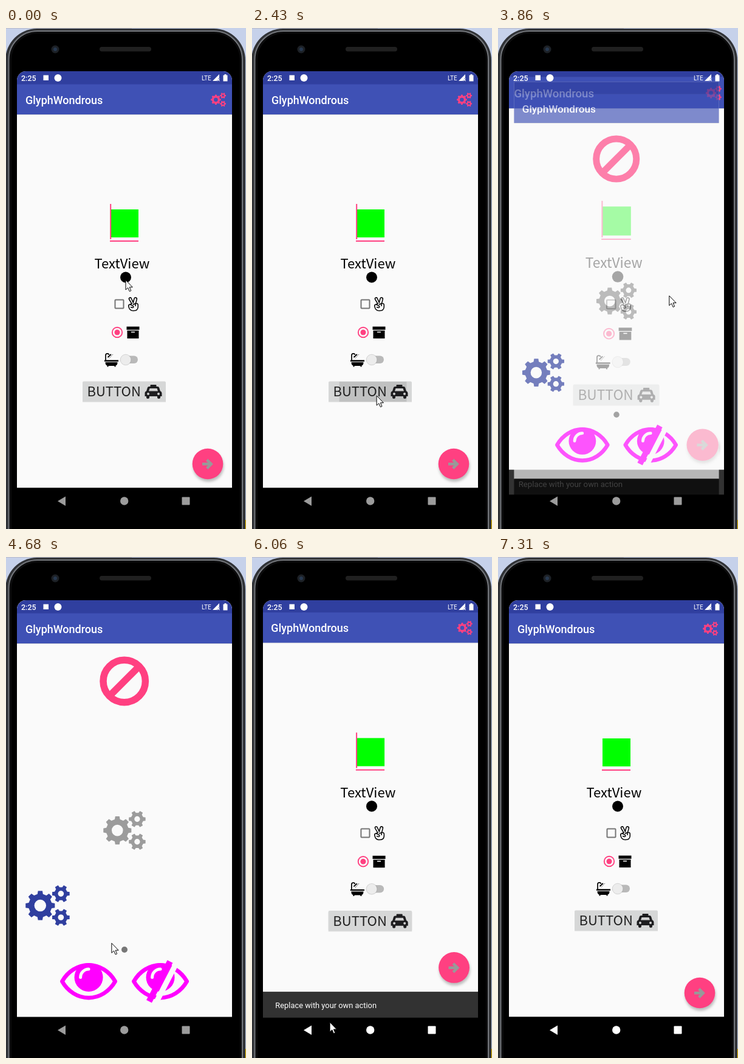
An HTML page for the animation above (7.43 s loop, 395 px wide and 823 px high).

```html
<!DOCTYPE html>
<html lang="en">
<head>
<meta charset="utf-8">
<title>Phone demo</title>
<style>
  html, body { margin: 0; width: 100%; height: 100%; overflow: hidden; background: #c6d1ea; }
  svg { display: block; width: 100vw; height: 100vh; }
  text { font-family: Roboto, sans-serif; fill: #fff; }
  .title { font-size: 18px; font-weight: 500; }
  .label { font-family: "Noto Sans CJK JP", "Noto Sans CJK SC", "Noto Sans CJK", "Noto Sans", sans-serif; font-size: 22px; fill: #000; }
  #fab { filter: drop-shadow(1px 4px 2px rgba(0,0,0,.25)); }
</style>
</head>
<body>
<svg viewBox="0 0 395 823">
  <defs>
    <clipPath id="screen"><path d="M18 803V86a15 15 0 0 1 15-15H357a15 15 0 0 1 15 15V803z"/></clipPath>
    <clipPath id="buttonArea"><rect x="126" y="581" width="137" height="33" rx="2"/></clipPath>
    <path id="cogs" fill-rule="evenodd"/>
    <g id="eye">
      <path d="M64 960C240 650 550 448 896 448S1552 650 1728 960C1552 1270 1242 1472 896 1472S240 1270 64 960Z"
        fill="none" stroke="#f0f" stroke-width="128" stroke-linejoin="round"/>
      <circle cx="896" cy="832" r="448" fill="#f0f"/>
      <path d="M640 832A256 256 0 0 1 896 576" fill="none" stroke="#fafafa" stroke-width="96" stroke-linecap="round"/>
    </g>
    <g id="chrome">
      <rect x="18" y="71" width="354" height="685" fill="#fafafa"/>
      <rect x="18" y="142" width="354" height="1" fill="#000" opacity=".12"/>
      <rect x="18" y="92" width="354" height="50" fill="#3f51b5"/>
      <rect x="18" y="71" width="354" height="21.500" fill="#303f9f"/>
      <text class="title" x="32" y="124.500">GlyphWondrous</text>
      <rect x="18" y="755.500" width="354" height="80"/>
    </g>
  </defs>

  <!-- phone body -->
  <path d="M0 0H207V1H0z" fill="#b9bccb"/>
  <path d="M391 808h4v15h-4z" fill="#fc0"/>
  <rect x="-1" y="1" width="395" height="900" rx="52" fill="#303236"/>
  <rect x="4.500" y="5" width="384.500" height="900" rx="47" fill="#0c0c0d" stroke="#75787d" stroke-width="2"/>
  <rect x="9" y="9" width="376" height="890" rx="43"/>
  <circle cx="81" cy="35" r="6.500" fill="#1d2126"/>
  <circle cx="81" cy="35" r="3" fill="#27384f"/>
  <rect x="154" y="31" width="85" height="7.500" rx="3.700" fill="#202020"/>

  <g clip-path="url(#screen)">
    <g id="main">
      <use href="#chrome"/>
      <use href="#cogs" transform="translate(337 106) scale(.0131)" fill="#ff4081"/>

      <rect x="172" y="298" width="46" height="46" fill="#0f0"/>
      <path d="M171 350H218" stroke="#ff4081" stroke-width="2"/>
      <path id="caret" d="M172.200 289V347" stroke="#ff4081" stroke-width="2"/>
      <text class="label" x="145.500" y="395">TextView</text>
      <circle cx="197" cy="409.500" r="9"/>

      <rect x="179.500" y="446.500" width="14" height="14" rx="1" fill="none" stroke="#757575" stroke-width="2"/>
      <path d="M207 453L202.500 445.500q-.5-2 1.400-2.500t2.400 1.200L209.300 451L211 444.500q.8-2.200 2.800-1.500t1.500 2.600L213.500 452.500q3.800-.3 3.800 2.500v3.500q-.5 6-7.300 6-5 0-7-3.500l-1.300-4q-.3-2.400 2.300-3zM204 454l5 2.500q2 2.500-1 3l-3-1M209 454.500l4-2M213 453v4"
        fill="none" stroke="#000" stroke-width="1.500"/>

      <circle id="radioRipple" cx="183" cy="500" r="16.500" opacity=".1"/>
      <circle cx="183" cy="500" r="8.200" fill="none" stroke="#ff4081" stroke-width="1.900"/>
      <circle cx="183" cy="500" r="4.500" fill="#ff4081"/>
      <path d="M198.500 490.500h21v5.200h-21zM199.500 497h19v13h-19z"/>
      <path d="M206 499.500h6" stroke="#fafafa" stroke-width="1.600"/>

      <path d="M164 547v-9.500q0-2.700 2.700-2.700t2.800 2.200M167.500 541l5.500-5" fill="none" stroke="#000" stroke-width="1.700"/>
      <path d="M170 542.500l6-6.500" stroke="#555" stroke-dasharray="1.500 1"/>
      <path d="M162 545.500h23v2.400h-23zM163.500 549h20q0 5-3 5.500v2h-2v-1.500h-10v1.500h-2v-2q-3-.5-3-5.500z"/>

      <rect id="track" x="194" y="538.500" width="23" height="12.500" rx="6.200"/>
      <circle id="switchRipple" cy="543.500" r="16.500"/>
      <circle id="thumb" cy="545" r="8.800" fill="#ececec" stroke="#000" stroke-opacity=".13"/>

      <path d="M126 583h137v31.500H126z" fill="#000" opacity=".13"/>
      <rect x="126" y="580.500" width="137" height="33" rx="2" fill="#d6d7d7"/>
      <rect id="press" y="581" height="33" opacity=".1" clip-path="url(#buttonArea)"/>
      <text class="label" x="133.500" y="605" style="fill:#212121">BUTTON</text>
      <path d="M238.500 586h8q1 0 1 1v2h2.300q1.800 0 2.400 2l1.700 5.500q2.600.5 2.600 3.500v5h-2.500v2q0 2-2.500 2t-2.500-2v-2h-13v2q0 2-2.500 2t-2.500-2v-2h-2.500v-5q0-3 2.600-3.500l1.700-5.500q.6-2 2.400-2h2.300v-2q0-1 1-1z" fill="#1d1d1f"/>
      <path d="M236.500 592h12l1.500 4.500h-15z" fill="#d0d0d0"/>
      <g fill="#d0d0d0"><circle cx="234" cy="601" r="2"/><circle cx="251" cy="601" r="2"/></g>

      <g id="fab">
        <circle cx="332" cy="716" r="25.300" fill="#ff4081"/>
        <circle id="fabRipple" cx="332" cy="716" fill="#fff" opacity=".25"/>
        <path d="M323 716.300H337M330.700 709.300l7 7-7 7" fill="none" stroke="#999" stroke-width="4.500"/>
      </g>
      <g id="snackbar">
        <rect x="18" y="713" width="354" height="43" fill="#323232"/>
        <text id="message" x="39" y="740" font-size="12.800">Replace with your own action</text>
      </g>
      <path d="M18 755.500h354v80h-354z"/>
    </g>

    <g id="detail">
      <use href="#chrome"/>
      <g fill="none" stroke="#ff4081" stroke-width="11.500">
        <circle cx="194.700" cy="204" r="34.700"/>
        <path d="M219 179.700L170.400 228.300"/>
      </g>
      <use href="#cogs" transform="translate(160 416.500) scale(.0364)" fill="#9c9c9c"/>
      <use href="#cogs" transform="translate(32 538.500) scale(.038)" fill="#303f9f"/>
      <circle cx="195" cy="645" r="5" fill="#777"/>
      <use href="#eye" transform="translate(89 646.800) scale(.0525)"/>
      <use href="#eye" transform="translate(207 646.800) scale(.0525)"/>
      <path d="M281 666L246 734" stroke="#fafafa" stroke-width="9"/>
      <path d="M270 664.500L235.500 730" stroke="#f0f" stroke-width="10"/>
    </g>

    <!-- status bar -->
    <g fill="#fff">
      <text x="25" y="86.500" font-size="12.500" font-weight="500">2:25</text>
      <rect x="61.500" y="77.500" width="8.500" height="8.500"/>
      <circle cx="85.500" cy="82" r="6"/>
      <text x="322" y="85.500" font-size="10">LTE</text>
      <path d="M340 87L351 76V81.500L346.500 87z"/>
      <path d="M347.500 83l4 4m0-4l-4 4" stroke="#fff" stroke-width="1.100"/>
      <path d="M357.500 77.500h2v-1.500h3v1.500h2v10h-7z"/>
    </g>
  </g>

  <ellipse id="backRipple" cx="91" cy="777.500" ry="21" fill="#fff" opacity=".2"/>
  <g id="nav">
    <path d="M98 769.500V785L85 777.200z"/>
    <circle cx="194.700" cy="777" r="6.700"/>
    <rect x="289.500" y="770.500" width="13" height="13" rx="1"/>
  </g>
  <path id="cursor" d="M0 0V16L3.700 12.600L6.300 18.600L8.800 17.500L6.300 11.700H11.300z" fill="#fff" stroke="#000"/>
</svg>

<script>
const LOOP = 7430;
const el = Object.fromEntries([...document.querySelectorAll('[id]')].map(e => [e.id, e]));
const set = (node, attrs) => { for (const k in attrs) node.setAttribute(k, attrs[k]); };
const show = (node, on) => set(node, { visibility: on ? 'visible' : 'hidden' });
const progress = (t, start, length) => Math.min(1, Math.max(0, (t - start) / length));
const easeOut = (t, start, length, power) => 1 - (1 - progress(t, start, length)) ** power;
const between = (t, a, b) => t >= a && t < b;

function gear(cx, cy, teeth, outer, root, hole) {
  const step = 2 * Math.PI / teeth, points = [];
  const add = (r, a) => points.push((cx + r * Math.cos(a)).toFixed(1) + ' ' + (cy + r * Math.sin(a)).toFixed(1));
  for (let i = 0; i < teeth; i++) {
    const a = i * step;
    add(root, a - step * .3);
    add(outer, a - step * .19);
    add(outer, a + step * .19);
    add(root, a + step * .3);
  }
  return `M${points.join('L')}ZM${cx - hole} ${cy}a${hole} ${hole} 0 1 0 ${2 * hole} 0a${hole} ${hole} 0 1 0 ${-2 * hole} 0z`;
}
set(el.cogs, { d: gear(640, 896, 8, 640, 510, 256) + gear(1536, 384, 6, 384, 285, 128) + gear(1536, 1408, 6, 384, 285, 128) });

// time, x, y
const pointerPath = [
  [0, 197, 414], [120, 196, 425], [360, 191, 500], [600, 182, 498], [850, 179, 496],
  [1000, 179, 498], [1120, 185, 520], [1400, 202, 534], [1550, 206, 547], [2030, 206, 548],
  [2170, 207, 597], [2430, 205, 604], [2690, 242, 605], [2850, 242, 605], [3110, 309, 672],
  [3250, 332, 706], [3500, 332, 706], [3860, 282, 440], [4390, 191, 386], [4530, 191, 386],
  [4680, 174, 634], [4920, 145, 718], [5170, 140, 722], [5290, 117, 759], [5440, 91, 775],
  [5800, 91, 775], [6060, 128, 764], [6350, 160, 824]
];
function pointerAt(t) {
  const i = pointerPath.findIndex(p => p[0] > t);
  if (i < 0) return pointerPath.at(-1).slice(1);
  const [a, b] = [pointerPath[i - 1], pointerPath[i]];
  const u = (t - a[0]) / (b[0] - a[0]);
  return [1, 2].map(k => a[k] + (b[k] - a[k]) * u);
}
const caretOff = [[580, 990], [1390, 1660], [2020, 2420], [2830, 3240], [6480, 6890], [7300, LOOP]];

const scaleWindow = s => `translate(195 437) scale(${s}) translate(-195 -437)`;

function draw(t) {
  // screen change
  const closing = t > 5000;
  const moved = closing ? easeOut(t, 5880, 600, 7) : easeOut(t, 3770, 600, 7);
  set(el.main, { transform: scaleWindow(1 + .05 * (closing ? 1 - moved : moved)) });
  set(el.detail, {
    transform: scaleWindow(closing ? 1 - .1 * moved : .85 + .15 * moved),
    opacity: closing ? 1 - progress(t, 5880, 100) : progress(t, 3770, 138)
  });

  show(el.caret, !caretOff.some(([a, b]) => between(t, a, b)));
  show(el.radioRipple, between(t, 990, 1260));

  // switch goes on, then off again
  const on = progress(t, 1525, 120) - progress(t, 1910, 120);
  const x = 197 + 14 * on;
  const tint = Math.min(1, on * 5);
  set(el.thumb, { cx: x, fill: on > .7 ? '#ff4081' : '#ececec' });
  set(el.track, { fill: `rgb(${185 + 65 * tint},${185 - 20 * tint},${185 + 7 * tint})` });
  set(el.switchRipple, { cx: x, fill: on > .7 ? '#ff4081' : '#000', opacity: .12 });
  show(el.switchRipple, between(t, 1500, 2040));

  const half = 55 + 85 * progress(t, 2430, 200);
  set(el.press, { x: 199 - half, width: 2 * half });
  show(el.press, between(t, 2425, 3360));

  // floating button and snackbar share one slide
  const raised = easeOut(t, 3600, 400, 2.5) * (1 - easeOut(t, 6640, 250, 2));
  set(el.fab, { transform: `translate(0 ${-42.5 * raised})` });
  set(el.snackbar, { transform: `translate(0 ${43 * (1 - raised)})` });
  set(el.message, { opacity: progress(t, 3680, 260) });
  set(el.fabRipple, { r: 25 * progress(t, 3360, 250) });
  show(el.fabRipple, between(t, 3360, 3780));

  set(el.nav, { fill: t < 5435 ? '#9c9c9c' : '#fff' });
  set(el.backRipple, { rx: 20 + 24 * progress(t, 5435, 200), opacity: .22 * (1 - progress(t, 5600, 200)) });
  show(el.backRipple, between(t, 5435, 5800));

  set(el.cursor, { transform: `translate(${pointerAt(t)})` });
}

function frame() {
  draw(performance.now() % LOOP);
  requestAnimationFrame(frame);
}
frame();
</script>
</body>
</html>
```
